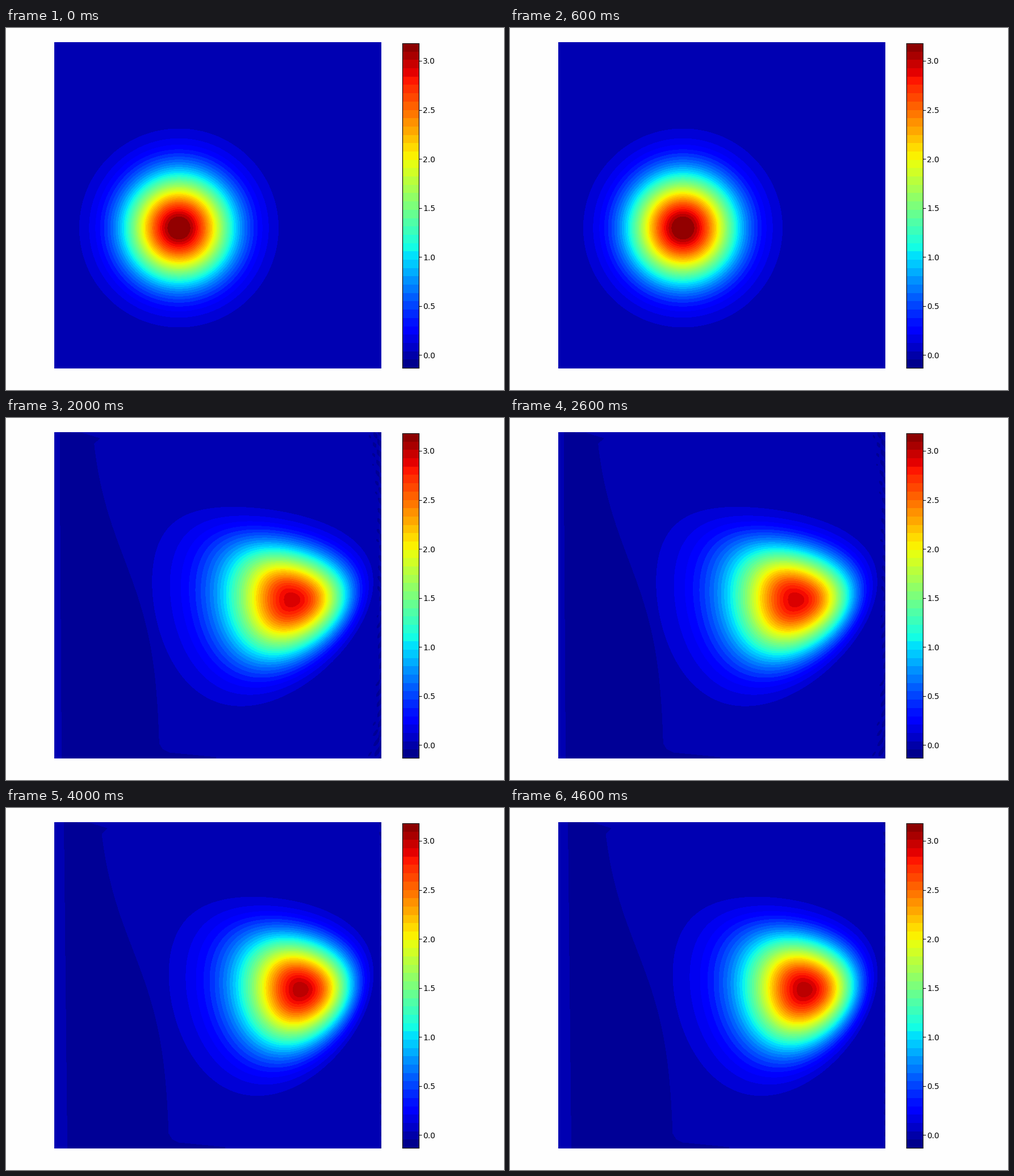
Recreate the animation shown at these times as a matplotlib script. Size 877 px wide and 639 px high, loop 5 s.

```python
import numpy as np
import matplotlib.pyplot as plt
from matplotlib.animation import FuncAnimation
from matplotlib.colors import Normalize

W, H, DPI = 877, 639, 100
LEFT, TOP, SIDE = 85, 25, 576
RIGHT, BOTTOM = LEFT + SIDE, TOP + SIDE
VMIN, VMAX, STEP = -0.131, 3.179, 0.08
RADIUS = 175                               # of the lowest contour
PEAKS = [3.183, 2.5, 2.934, 3.095, 3.02]   # height at each time step

norm = Normalize(VMIN, VMAX)
cmap = plt.get_cmap("jet")
levels = np.arange(1, 39) * STEP
theta = np.radians(np.arange(360))

plt.rcParams["font.family"] = "DejaVu Sans"


def tone(value):
    return cmap(norm(value))


GROUND, NEGATIVE = tone(0.02), tone(-0.06)


def centre(t):
    """The peak glides from its start to a resting place on the right."""
    left = np.exp(-0.783 * t**1.765)
    return 519 - 214.5 * left, 320.5 + 32.5 * left**1.6


def contour(t, peak, level):
    """A circle of a Gaussian, stretched, bent and pulled into a triangle."""
    s = np.sqrt(np.log(peak / level) / np.log(peak / STEP))
    moved = min(t, 1)
    fade = 0.5 ** (t - 1)
    stretch = 1 + 0.22 * moved * fade
    corner = moved * (8 + 14 * fade)
    bow = moved * (48 - 2.2 * t)
    lag = 52 * np.clip(t - 1, 0, 1)

    px, py = centre(t)
    u, v = s * np.cos(theta), s * np.sin(theta)
    x = px - lag * s**2.4 + RADIUS * stretch * u
    x = x + s * corner * (np.cos(2 * theta) - 1)
    y = py + 12 * moved * s**2 + RADIUS * v - bow * u**2
    y = y - 0.35 * s * corner * np.sin(2 * theta)
    return x, y


def wake(t):
    """Slightly negative area left behind by the moving density."""
    shift = 0.45 - 1.45 * 0.31 ** (t - 1)
    strip = 1 - 0.5 ** (t - 1)
    y = np.linspace(45, 575, 120)
    x = 208 + 64 * np.tanh((y - 250) / 170) + shift * (33 + 8 * (y - 45) / 530)
    a, b = x[0], x[-1]
    xs = [LEFT + 20 * strip, a - 20, a + 10, *x,
          b + 6, b + 18, b + 100, b + 100, LEFT + 27 * strip]
    ys = [TOP, 27, 36, *y, 585, 591, 599, BOTTOM, BOTTOM]
    return xs, ys


def ripple(t):
    """Fine waves at the right edge, wider towards the corners."""
    x, y = np.meshgrid(np.arange(560, RIGHT + 1), np.arange(TOP, BOTTOM + 1))
    away = np.abs(y - 313)
    reach = 0.4 ** (t - 1) * (20 + 46 * (away / 288) ** 4)
    wave = 0.6 * np.sin(2 * np.pi * (x + 0.55 * away) / 11)
    wave = wave + 0.4 * np.sin(2 * np.pi * y / 17 + x / 9)
    return x, y, wave + 0.1 - 1.1 * (RIGHT - x) / reach


fig = plt.figure(figsize=(W / DPI, H / DPI), dpi=DPI, facecolor="#fefefe")


def pixel_axes(x0, y0, x1, y1):
    return fig.add_axes([x0 / W, 1 - y1 / H, (x1 - x0) / W, (y1 - y0) / H])


ax = pixel_axes(LEFT, TOP, RIGHT, BOTTOM)
ax.set_facecolor(GROUND)
ax.set(xticks=[], yticks=[])
ax.spines[:].set_visible(False)

bar = pixel_axes(697.6, 27, 726.6, 600)
edges = np.linspace(VMIN, VMAX, 40)
mids = (edges[:-1] + edges[1:]) / 2
bar.pcolormesh([0, 1], edges, mids[:, None], cmap=cmap, norm=norm)
bar.set(xticks=[], yticks=np.arange(0, 3.1, 0.5), ylim=(VMIN, VMAX))
bar.yaxis.tick_right()
bar.tick_params(axis="y", pad=2, labelsize=10)


def draw(t):
    for art in [*ax.patches, *ax.collections]:
        art.remove()
    if t > 0:
        ax.fill(*wake(t), color=NEGATIVE, lw=0, antialiased=False)
        ax.contourf(*ripple(t), levels=[0, 9], colors=[NEGATIVE])
    peak = PEAKS[t]
    for level in levels[levels < peak]:
        mid = level + (STEP if level == levels[-1] else STEP / 2)
        ax.fill(*contour(t, peak, level), color=tone(mid), lw=0, antialiased=False)
    ax.set(xlim=(LEFT, RIGHT), ylim=(BOTTOM, TOP))
    return []


anim = FuncAnimation(fig, draw, frames=len(PEAKS), interval=1000,
                     init_func=lambda: [], repeat=True, repeat_delay=0)
plt.show()
```
